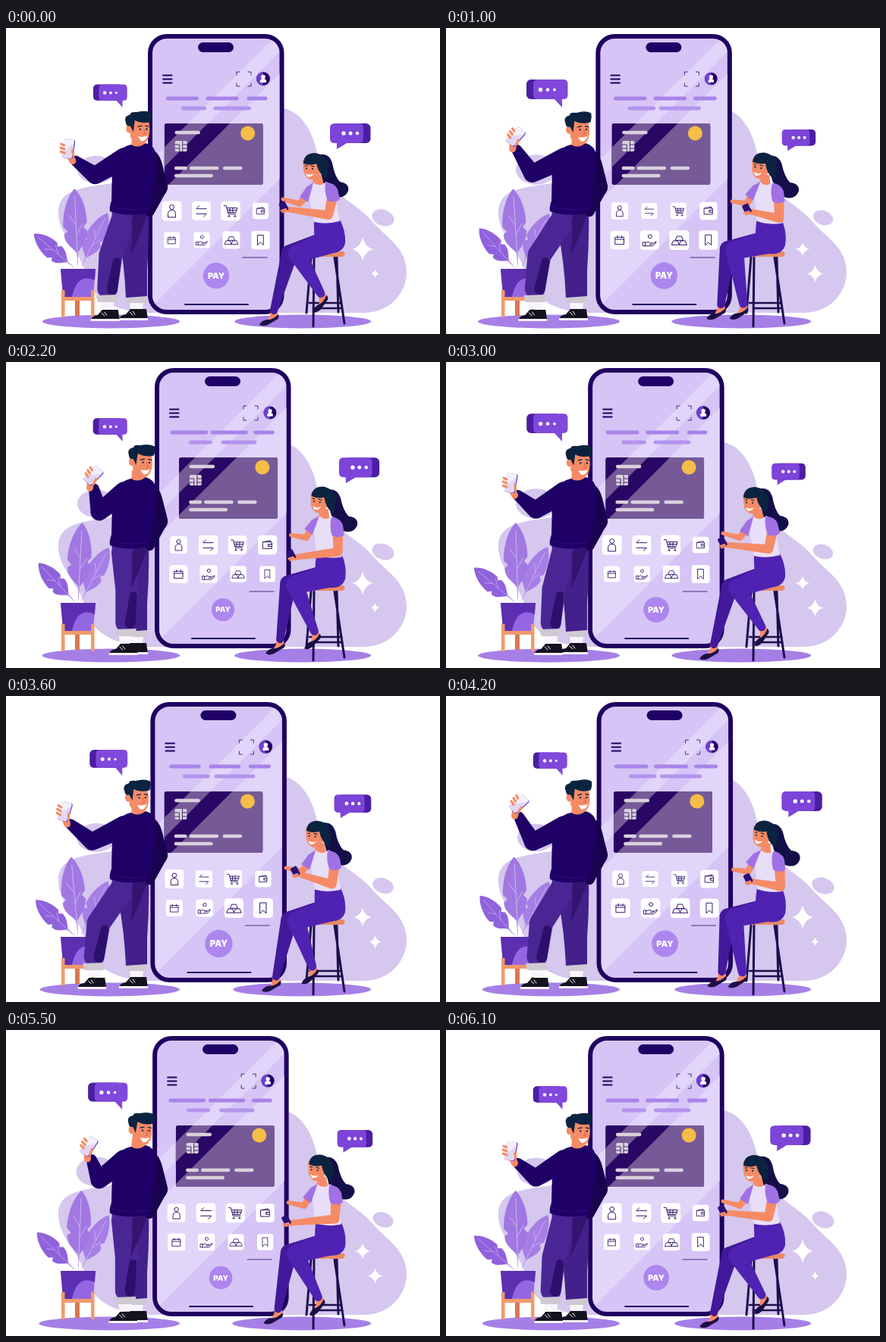
Write an HTML page that moves like this. It is 572 by 404 pixels and loops after 6.2 s.

```html
<!DOCTYPE html>
<html lang="en">
<head>
<meta charset="utf-8">
<title>Mobile payment</title>
<style>
html, body { margin: 0; width: 100%; height: 100%; overflow: hidden; background: #fff; }
svg { display: block; width: 572px; height: 404px; }
.line { fill: none; stroke-linecap: round; stroke-linejoin: round; }
.skin { fill: #f58b66; }
.hair { fill: #0b2340; }
.navy { fill: #1f0066; }
.icon { fill: none; stroke: #2b1166; stroke-width: 1; stroke-linejoin: round; stroke-linecap: round; }
.pay { font: 900 11px Inter, Arial, sans-serif; fill: #fff; text-anchor: middle; }
</style>
</head>
<body>
<svg viewBox="0 0 572 404">
  <defs>
    <clipPath id="screenClip"><rect x="193" y="14" width="167.500" height="358" rx="19"/></clipPath>
    <clipPath id="cardClip"><rect x="208" y="126" width="130" height="81" rx="3"/></clipPath>
    <g id="leaf">
      <path d="M0 0L-1-20C-5-26-18-32-17-44L-12-47-18-53C-18-74-9-92 0-100C9-92 16-74 15-57L10-52 15-47C15-34 5-27 1-20Z"/>
      <path class="line" stroke="#d5c1f5" stroke-width=".8" d="M0-10V-90M0-55L-9-67M0-42L9-56"/>
    </g>
    <path id="star" fill="#fff" d="M0-1Q.2-.2 1 0Q.2.2 0 1Q-.2.2-1 0Q-.2-.2 0-1Z"/>
    <g id="shoe">
      <path fill="#14121f" d="M-12-3H9L11 11H-27Q-26 5-18 4Z"/>
      <path fill="#f5f2fa" d="M-27 9H11V12H-27Z"/>
      <path class="line" stroke="#fff" d="M-13 1L-9 5M-9 0L-6 4"/>
    </g>
    <g id="cuff">
      <path fill="#f7f4fb" d="M-9 5H9L8 15H-8Z"/>
      <path fill="#cfc9d3" d="M-15-3L14-4L13 6H-13Z"/>
    </g>
    <g id="flat">
      <path class="skin" d="M-4-6L4-5L6 8L-10 16L-5 6Z"/>
      <path fill="#1d0f45" d="M6 5Q8 11 2 13L-8 19Q-17 22-19 18Q-14 12-9 12Q-2 13 6 5Z"/>
    </g>
  </defs>

  <g fill="#d5c7ee">
    <path d="M360 105C390 107 405 140 410 165C420 222 462 228 485 258C505 280 528 290 528 325C526 352 505 376 470 376H190C140 376 108 352 104 322C98 295 70 275 69 245C68 215 95 211 140 205Q200 190 230 140Q280 95 360 105Z"/>
    <ellipse id="spotL" cx="119" cy="187" rx="26" ry="19"/>
    <ellipse id="spotR" cx="497" cy="250.500" rx="15" ry="10.500"/>
  </g>
  <use id="starBig" href="#star"/><use id="starSmall" href="#star"/>
  <g fill="#a67fe6">
    <ellipse id="shadowL" cy="387.500" ry="9"/><ellipse id="shadowR" cy="387.500" ry="9"/>
  </g>

  <g>
    <use id="leafR" href="#leaf" fill="#a67ee6"/>
    <use id="leafL" href="#leaf" fill="#8f62dc"/>
    <use id="leafC" href="#leaf" fill="#a178e2"/>
    <path fill="#d9784f" d="M91 355h6v25h-6z"/>
    <path fill="#9467e2" d="M72 318H118L115 352Q113 359 106 360H84Q77 359 75 352Z"/>
    <path fill="#5c2fb0" d="M72 318H118L117 333Q92 322 86 360H84Q77 359 75 352Z"/>
    <path fill="#f09a6c" d="M73 346h4.500v36h-4.500zM112 346h4.500v36h-4.500zM73 355h43v5H73z"/>
  </g>

  <g id="phone">
    <rect x="190" y="11" width="173.500" height="364" rx="22" fill="#d6c4f6" stroke="#1f005f" stroke-width="6"/>
    <g clip-path="url(#screenClip)" fill="#e1d5f9">
      <path d="M366 0H392L0 392V366ZM421 0H560L160 400H21Z"/>
    </g>
    <rect x="253" y="19" width="47" height="13" rx="6.500" class="navy"/>
    <path class="line" stroke="#1f005f" stroke-width="2" d="M207 62.500H218.500M207 67.500H218.500M207 72.500H218.500"/>
    <path class="line" stroke="#4b2d82" stroke-width="1" d="M304 62V58H308M319 58H323V62M323 73V77H319M308 77H304V73"/>
    <g id="avatar">
      <circle r="9" fill="#250065"/><path fill="#6e3fd0" d="M0-9A9 9 0 0 0 0 9Z"/>
      <circle cy="-2.500" r="2.800" fill="#fff"/><path fill="#fff" d="M-4 5V3Q-4 0 0 0Q4 0 4 3V5Z"/>
    </g>
    <g id="dashes" class="line" stroke-width="4.800"></g>
    <g id="card" clip-path="url(#cardClip)">
      <rect x="208" y="126" width="130" height="81" fill="#290764"/>
      <path id="gloss" fill="#755a97" d="M266 100H292L172 220H146ZM321 100H460V220H201Z"/>
      <path class="line" stroke="#d9d1dc" stroke-width="4.500" d="M224 138H253M223.500 185H236M243.500 185H277.500M287.500 185H308.500M223.500 195H270"/>
      <rect x="222" y="149" width="16" height="14" rx="2" fill="#d9d1dc"/>
      <path class="line" stroke="#4a2d7a" stroke-width="1" d="M222 154H228V163M238 154H232V149M222 159H228M232 154V163M232 159H238"/>
      <circle cx="318" cy="139" r="9.500" fill="#f6bd48"/>
    </g>
    <g id="icons"></g>
    <path class="line" stroke="#4b2d82" stroke-width="1" d="M312 303H344"/>
    <g id="pay"><circle r="17.500" fill="#ad86ee"/><text class="pay" y="4">PAY</text></g>
    <path class="line" stroke="#1f005f" stroke-width="2" d="M236 365H319"/>
  </g>

  <g id="bubbleL">
    <rect x="106" y="68" width="46" height="26" rx="6" fill="#4b1ea3"/>
    <path fill="#8148dc" d="M121 68H155Q160.500 68 160.500 74V88Q160.500 94 155 94H153V105L143 94H121Q115 94 115 88V74Q115 68 121 68Z"/>
    <g fill="#fff"><circle cx="124.500" cy="81.500" r="2.700"/><circle cx="134" cy="81.500" r="2.300"/><circle cx="143" cy="81.500" r="1.900"/></g>
  </g>
  <g id="bubbleR">
    <rect x="434" y="126" width="46.500" height="26" rx="6" fill="#4b1ea3"/>
    <path fill="#7c44d8" d="M433 126H466Q471 126 471 132V146Q471 152 466 152H449L436 160V152H433Q427 152 427 146V132Q427 126 433 126Z"/>
    <g fill="#fff"><circle cx="445" cy="139" r="2.700"/><circle cx="454" cy="139" r="2.500"/><circle cx="463" cy="139" r="2.300"/></g>
  </g>

  <g>
    <use href="#cuff" x="172" y="357"/>
    <use href="#shoe" x="176" y="374"/>
    <path fill="#43208a" d="M146 240H188Q189 280 186 320L186 354L158 356Q156 310 148 270Z"/>
    <use id="shoeL" href="#shoe"/>
    <path id="legL" fill="#4a2695"/>
    <path id="shadeL" fill="#2d0f6c"/>
    <use id="cuffL" href="#cuff"/>
    <path fill="#341371" d="M164 244Q169 270 164 300Q176 276 187 244Z"/>
    <path fill="#4a2695" d="M139 236H170L164 262H141Z"/>
    <path class="skin" d="M166 143H183V160Q174 165 165 158Z"/>
    <path fill="#190350" d="M185 158Q201 160 206 180L213 208Q214 214 209 220L194 247Q188 252 184 246L187 232L194 211L184 188Z"/>
    <path class="navy" d="M150 162Q157 155 165 154Q174 160 184 152Q196 155 198 168L194 214Q190 238 187 244Q160 250 137 242Q136 236 139 228L140 185Z"/>
    <path class="line" stroke="#2f0f7c" d="M139 236Q162 243 187 238"/>
    <path id="armL" class="navy"/>
    <g id="hand">
      <path class="line" stroke="#f58b66" stroke-width="9" d="M-1 3L-7-8"/>
      <g transform="translate(-7 -13) rotate(8)">
        <rect x="-7" y="-12.500" width="15" height="25" rx="2.500" fill="#7a55c4"/>
        <rect x="-7.500" y="-12.500" width="14" height="24.500" rx="2.500" fill="#f4f0fb"/>
        <path fill="#d3c4f0" d="M-6 5L6-8V11H-6Z" opacity=".6"/>
        <path class="line" stroke="#f58b66" stroke-width="3.200" d="M-10-5L-6-4M-10 0L-5 1M-9 5L-4 6M8 8L6 1"/>
      </g>
    </g>
    <g id="headM">
      <path class="skin" d="M163 122H187Q190 134 187 145Q183 154 176 153Q167 152 163 143Z"/>
      <ellipse class="skin" cx="161.500" cy="133" rx="4" ry="5.500"/>
      <path class="hair" d="M157 124Q154 116 163 114Q163 110 172 111Q184 108 191 112Q193 116 190 124Q178 127 169 122L167 137L163 129Q158 131 157 124Z"/>
      <path class="line" stroke="#0b2340" stroke-width="1.300" d="M173 130L178 129M183 129L187 130"/>
      <circle cx="176" cy="133.500" r="1.200" class="hair"/><circle cx="184.500" cy="133.500" r="1.200" class="hair"/>
      <path class="line" stroke="#cf6548" d="M181 134L183 139L180 140"/>
      <path fill="#fff" d="M173 143Q180 145 186 142Q183 150 177 149Z"/>
    </g>
  </g>

  <g>
    <g class="line" stroke="#1c0e4d" stroke-width="3">
      <path d="M406 303L405 394M402 303L396 376M433 303L446 390M436 303L438 375"/>
      <path stroke-width="2.500" d="M400 363H442M405 370H443"/>
    </g>
    <use id="flatL" href="#flat"/><use id="flatR" href="#flat"/>
    <path fill="#e78a63" d="M374 295H445Q449 298 444 302H378Q372 301 374 295Z"/>
    <path id="thighL" fill="#42199a"/>
    <path id="thighR" fill="#4f22b2"/>
    <path id="armFar" class="skin"/>
    <g id="torso">
      <path id="locks" fill="#140f48" d="M410 168Q425 163 430 178Q433 196 440 203Q453 205 451 215Q446 227 432 222Q420 216 416 196Z"/>
      <path fill="#4f22b2" d="M406 253H440Q448 268 447 284Q444 297 428 297H412Q405 283 406 253Z"/>
      <path class="skin" d="M405 194H416L419 208Q411 214 404 206Z"/>
      <path fill="#e8def7" d="M405 204Q413 211 422 203L432 209L440 255Q422 260 406 256L400 225L394 220Z"/>
      <path fill="#a071e4" d="M405 204L396 210L387 223L398 230L402 216Z"/>
      <g transform="translate(-5 -1)">
        <path class="skin" d="M396 176Q408 168 418 180L419 192Q414 203 405 201Q397 196 397 188Z"/>
        <path class="hair" d="M397 180Q397 167 411 166Q427 167 430 184L428 200Q417 194 414 180Q406 183 397 180Z"/>
        <path class="line" stroke="#0b2340" stroke-width="1.100" d="M399 183L402 183M407 183L411 184"/>
        <circle cx="401" cy="186.500" r="1.100" class="hair"/><circle cx="409" cy="187" r="1.100" class="hair"/>
        <path fill="#fff" d="M400 193Q406 196 411 193Q407 199 402 197Z"/>
      </g>
    </g>
    <path id="armNear" class="skin"/>
    <g id="mobile">
      <path class="line" stroke="#f58b66" stroke-width="6" d="M1 2L7 6"/>
      <rect x="-5" y="-5" width="9" height="13" rx="2" transform="rotate(-28)" fill="#2b0f78"/>
      <path class="line" stroke="#f58b66" stroke-width="2.500" d="M-3 7L3 5M-1 9L5 7"/>
    </g>
    <path id="sleeve" fill="#a071e4" d="M421 204Q433 204 437 213L440 226Q433 232 424 228Q419 216 421 204Z"/>
  </g>
</svg>
<script>
const LOOP = 6200, STEP = 100, SWAY = 3.1, PULSE = LOOP / 3000;
const $ = id => document.getElementById(id);
const set = (el, attrs) => { for (const k in attrs) el.setAttribute(k, attrs[k]); return el; };
const move = (id, transform) => set($(id), { transform });
const add = (parent, tag, attrs) =>
  parent.appendChild(set(document.createElementNS('http://www.w3.org/2000/svg', tag), attrs));

// x, y, time of largest size, drawing
const icons = [
  [218.5, 241.5, 0, 'M-3-5a3 3 0 1 1 6 0a3 3 0 1 1-6 0M-5 8V4Q-5-1 0-1Q5-1 5 4V8Z'],
  [257.5, 241.5, 2.6, 'M7-3H-7L-3-7M-7 4H7L3 8'],
  [296, 241.5, 2.8, 'M-9-7H-6L-3 4H7M-5-4H9L7 2H-4M-1-4V2M3-4V2M-4-1H8M-3 7a1 1 0 1 0 2 0a1 1 0 1 0-2 0M5 7a1 1 0 1 0 2 0a1 1 0 1 0-2 0'],
  [335.5, 241.5, 1.8, 'M-6-4H6V5H-6ZM6-1H1V2H6M-5-4L4-6V-4M2.5.5H3'],
  [218.5, 280, 1.55, 'M-6-4H6V6H-6ZM-6-1H6M-3-6V-3M3-6V-3'],
  [258, 280, 1.4, 'M-9 3H-6V8H-9ZM-6 4Q-2 1 1 4H4Q5 6 0 6M4 5L9 2Q9 5 4 8H-6M-2-5a2.500 2.500 0 1 0 5 0a2.500 2.500 0 1 0-5 0'],
  [297, 280, .9, 'M-10 6L-8 1H-2L0 6ZM0 6L2 1H8L10 6ZM-5 0L-3-5H3L5 0Z'],
  [335.5, 280, .6, 'M-4-7H4V7L0 3L-4 7Z']
].map(([x, y, peak, d]) => {
  const g = add($('icons'), 'g', {});
  add(g, 'rect', { x: -12, y: -12, width: 24, height: 24, rx: 4, fill: '#fff' });
  add(g, 'path', { d, class: 'icon', transform: 'scale(.92)' });
  return { g, x, y, peak };
});

// centre, y, length, time of greatest length
const dashes = [[232.5, 93, 41, 2], [285, 93, 41, 2], [331, 93, 24, 1.2], [247.5, 106, 29, .9], [298, 106, 46, .9]]
  .map(([x, y, len, peak]) => ({
    el: add($('dashes'), 'path', { stroke: y < 100 ? '#a884ea' : '#b394ed' }), x, y, len, peak
  }));

// Tapered capsules joined end to end; each point is [x, y, radius]
function limb(id, ...pts) {
  let d = '';
  for (let i = 1; i < pts.length; i++) {
    const [ax, ay, ar] = pts[i - 1], [bx, by, br] = pts[i];
    const len = Math.hypot(bx - ax, by - ay), nx = (ay - by) / len, ny = (bx - ax) / len;
    d += `M${ax + nx * ar} ${ay + ny * ar}A${ar} ${ar} 0 0 1 ${ax - nx * ar} ${ay - ny * ar}` +
      `L${bx - nx * br} ${by - ny * br}A${br} ${br} 0 0 1 ${bx + nx * br} ${by + ny * br}Z`;
  }
  set($(id), { d });
}

function turn(x, y, cx, cy, deg) {
  const a = deg * Math.PI / 180, c = Math.cos(a), s = Math.sin(a);
  return [cx + (x - cx) * c - (y - cy) * s, cy + (x - cx) * s + (y - cy) * c];
}

function draw(t) {
  const cos = (delay = 0, period = SWAY) => Math.cos(2 * Math.PI * (t - delay) / period);
  const sin = delay => cos(delay + SWAY / 4);
  const rise = (delay = 0) => (1 - cos(delay)) / 2;
  const sway = rise(), beat = cos(0, PULSE);
  const zoom = (x, y, s) => `translate(${x} ${y}) scale(${s}) translate(${-x} ${-y})`;

  // background
  set($('shadowL'), { cx: 137 + 1.5 * beat, rx: 92 - 1.5 * beat });
  set($('shadowR'), { cx: 390.2 + beat, rx: 90.8 - beat });
  move('starBig', `translate(470 292) scale(${11.3 + 2.3 * beat} ${12.3 + 3.3 * beat})`);
  move('starSmall', `translate(486.5 324.500) scale(${8 - 2.8 * beat} ${8.7 - 2.8 * beat})`);
  move('spotL', zoom(119, 187, 1 - .04 * beat));
  move('spotR', `rotate(20 497 250.500) ` + zoom(497, 250.5, .95 + .05 * beat));
  move('bubbleL', zoom(156, 104, .91 - .09 * beat));
  move('bubbleR', `translate(${19 * sway} 0) ` + zoom(439, 173, .915 + .085 * beat));

  // plant
  move('leafC', `translate(95 318) rotate(${-1 - 4 * sin(-.2)}) scale(.95 1.060)`);
  move('leafL', `translate(92 318) rotate(${-50 + 11 * sway}) scale(.72 .72)`);
  move('leafR', `translate(98 318) rotate(${26 + 2 * sway}) scale(.75 .82)`);

  // phone
  const shift = 14.4 * sway, slide = 24.5 * rise(.26) - 1 - shift;
  move('phone', `translate(${shift} 0)`);
  move('card', `translate(${slide} 0)`);
  move('gloss', `translate(${-slide} 0)`);
  move('avatar', `translate(339 67) scale(${.95 + .05 * cos()})`);
  move('pay', `translate(277 327) scale(${.95 + .09 * cos(.6)})`);
  for (const i of icons)
    set(i.g, { transform: `translate(${i.x} ${i.y}) scale(${.98 + .105 * cos(i.peak)})` });
  for (const s of dashes) {
    const half = s.len / 2 * (1 + .1 * cos(s.peak));
    set(s.el, { d: `M${s.x - half} ${s.y}H${s.x + half}` });
  }

  // man
  const stride = sin(-.05), ankle = 136 - 22 * stride, knee = 140 - 20 * stride;
  limb('legL', [155, 252, 16], [knee, 300, 15.5], [ankle, 344, 13.5]);
  limb('shadeL', [knee + 8, 308, 5], [ankle + 6, 345, 7]);
  move('cuffL', `translate(${ankle} 356)`);
  move('shoeL', `translate(${ankle + 5} 375)`);
  const wx = 98 - 16 * sin(-.3), wy = 164 + 9 * cos(-.15);
  limb('armL', [156, 172, 14], [118 - 5 * stride, 195 - 3 * stride, 11.5], [wx + 3, wy + 3, 7]);
  move('hand', `translate(${wx} ${wy}) rotate(${26 - 26 * cos(.07)})`);
  move('headM', `translate(${2 - 2 * sin(-.3)} ${stride}) rotate(${-2 * stride} 174 150)`);

  // woman
  const lean = 9 * sway, at = (x, y) => turn(x, y, 418, 285, lean);
  move('torso', `rotate(${lean} 418 285)`);
  move('sleeve', `rotate(${lean} 418 285)`);
  move('locks', `rotate(${-12 * sway} 425 175)`);
  const heel = [353 + 13 * sway, 373 - 11 * sway];
  const swing = cos(-.25), step = [403 + 13.6 * swing, 357.5 - 8 * swing];
  limb('thighL', [428, 281, 15], [374 - 3 * sway, 297 - 7 * sway, 11], [...heel, 5]);
  limb('thighR', [430, 281, 16], [384 - 5 * sway, 298 - 6 * sway, 12], [...step, 5.5]);
  move('flatL', `translate(${heel})`);
  move('flatR', `translate(${step}) rotate(${-13 * (1 + swing)})`);
  limb('armFar', [...at(396, 221), 5], [387 + 14 * sway, 232, 4], [365 + 17 * sway, 226 + 4 * sway, 2.5]);
  const hx = 381 + 18 * sin(.5), hy = 242 + 12 * sin(1.2);
  limb('armNear', [...at(431, 219), 7], [425 + 20 * sway, 247 + 6 * sway, 6], [hx + 5, hy + 5, 3.5]);
  move('mobile', `translate(${hx} ${hy})`);
}

function tick() {
  draw(Math.floor(performance.now() % LOOP / STEP) * STEP / 1000);
  requestAnimationFrame(tick);
}
tick();
</script>
</body>
</html>
```
